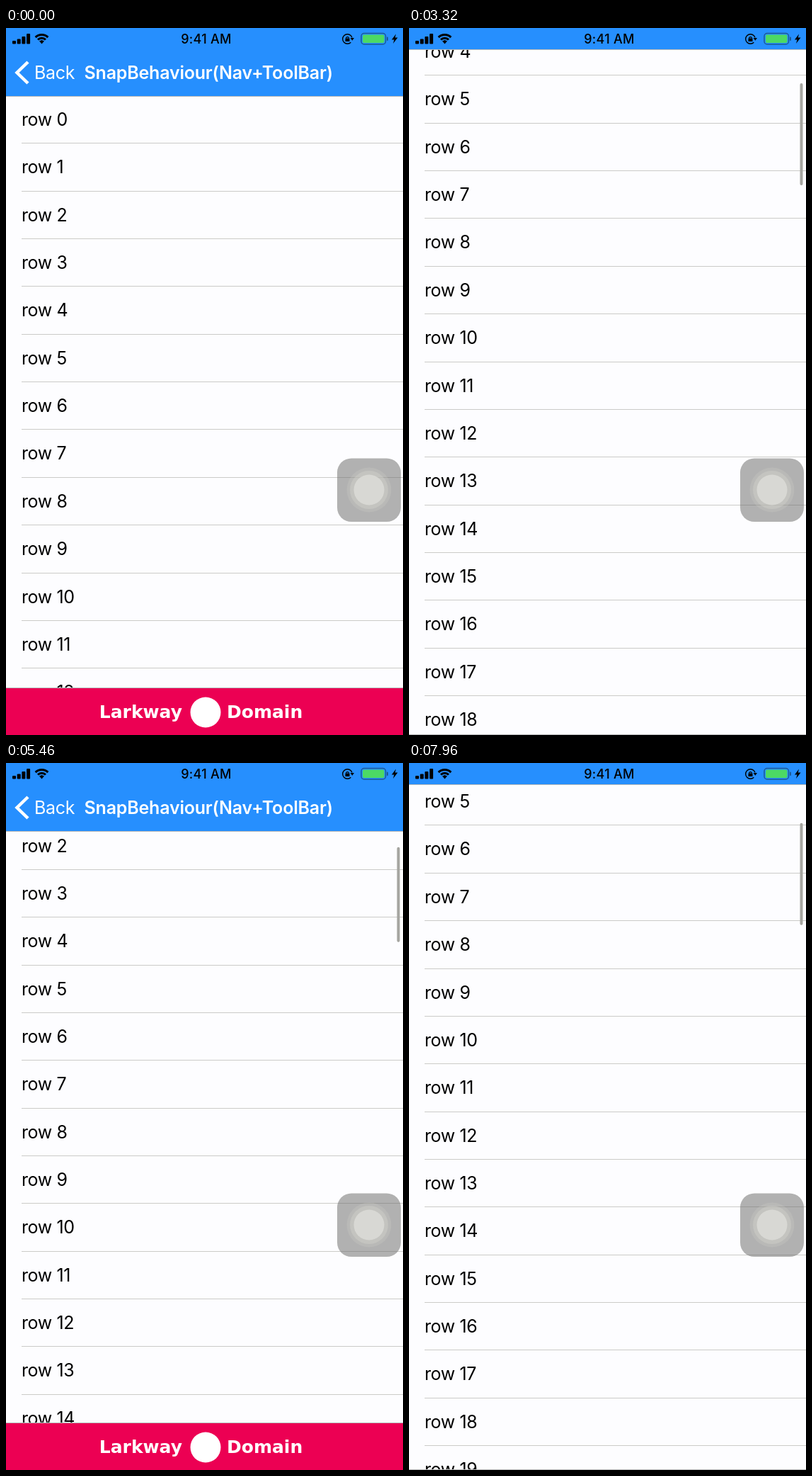
An HTML page with a canvas that plays this animation: 561 by 998 pixels, repeating every 8 s.

```html
<!DOCTYPE html>
<html lang="en">
<head>
<meta charset="utf-8">
<title>Snapping bars</title>
<style>
  html, body { margin: 0; width: 100%; height: 100%; overflow: hidden; }
  canvas { display: block; }
</style>
</head>
<body>
<canvas id="stage" width="561" height="998"></canvas>
<script>
const ctx = document.getElementById('stage').getContext('2d');
const W = 561, H = 998, LOOP = 8000;
const STATUS = 30, BAR = 66, ROW = 67.35;
const DECAY = 500, SNAP_DISTANCE = 52;
const BLUE = '#268ffe', PINK = '#ec0053', HAIRLINE = '#b8b8b8';

// Each flick glides exponentially towards its resting offset.
const flicks = [
  { start: 1726, to: 381, hide: true },
  { start: 3828, to: 138, hide: false },
  { start: 5956, to: 374, hide: true },
  { start: 7902, to: 750, hide: true }
];

const clamp = v => Math.max(0, Math.min(1, v));
const mix = (a, b, k) => a + (b - a) * k;

function stateAt(time) {
  let offset = 0, hidden = 0, thumb = 0;
  flicks.forEach((flick, i) => {
    if (time < flick.start) return;
    const end = i + 1 < flicks.length ? Math.min(time, flicks[i + 1].start) : time;
    const age = end - flick.start;
    const from = offset;
    offset = mix(flick.to, from, Math.exp(-age / DECAY));
    const progress = clamp(Math.abs(offset - from) / SNAP_DISTANCE);
    hidden = flick.hide ? Math.max(hidden, progress) : Math.min(hidden, 1 - progress);
    thumb = clamp(age / 40) * clamp((2000 - age) / 300);
  });
  return { offset, hidden, thumb };
}

function rect(x, y, w, h, color) {
  ctx.fillStyle = color;
  ctx.fillRect(x, y, w, h);
}

function rounded(x, y, w, h, r, color) {
  ctx.fillStyle = color;
  ctx.beginPath();
  ctx.roundRect(x, y, w, h, r);
  ctx.fill();
}

function disc(x, y, r, color) {
  ctx.fillStyle = color;
  ctx.beginPath();
  ctx.arc(x, y, r, 0, Math.PI * 2);
  ctx.fill();
}

function arc(x, y, r, from, to, width) {
  ctx.lineWidth = width;
  ctx.beginPath();
  ctx.arc(x, y, r, from * Math.PI, to * Math.PI);
  ctx.stroke();
}

function polygon(points, color) {
  ctx.fillStyle = color;
  ctx.beginPath();
  points.forEach(([x, y]) => ctx.lineTo(x, y));
  ctx.fill();
}

function label(text, x, y, font, color, spacing = 0, align = 'left') {
  ctx.font = font;
  ctx.letterSpacing = spacing + 'px';
  ctx.textAlign = align;
  ctx.fillStyle = color;
  ctx.fillText(text, x, y);
}

function drawRows(offset) {
  rect(0, 0, W, H, '#fdfdff');
  const first = Math.max(0, Math.floor((offset - BAR) / ROW));
  for (let i = first; i < first + 16; i++) {
    const top = 96 + i * ROW - offset;
    label('row ' + i, 22, Math.round(top + 42), '25px Inter, sans-serif', '#000', -0.4);
    rect(22, Math.round(top + ROW - 1), W - 22, 1, '#cbcbc8');
  }
}

function drawThumb({ offset, hidden, thumb }) {
  ctx.globalAlpha = thumb;
  const top = mix(97.3, 24.6, hidden) + offset * 0.146;
  rounded(552.5, top, 4, mix(134, 144, hidden), 2, '#a5a5a0');
  ctx.globalAlpha = 1;
}

function drawNavBar(hidden) {
  const shift = -BAR * hidden;
  const bottom = STATUS + BAR + shift;
  rect(0, 0, W, bottom, BLUE);
  rect(0, bottom, W, 1, HAIRLINE);
  ctx.save();
  ctx.translate(0, shift);
  ctx.globalAlpha = 1 - hidden;
  ctx.strokeStyle = '#fff';
  ctx.lineWidth = 4.5;
  ctx.beginPath();
  ctx.moveTo(31, 48);
  ctx.lineTo(15.5, 63);
  ctx.lineTo(31, 78);
  ctx.stroke();
  label('Back', 40, 72, '25px Inter, sans-serif', '#fff', -0.3);
  label('SnapBehaviour(Nav+ToolBar)', 110.5, 72, '600 25px Inter, sans-serif', '#fff', -0.2);
  ctx.restore();
}

function drawToolBar(hidden) {
  const top = H - BAR * (1 - hidden);
  const font = 'bold 25px "DejaVu Sans", sans-serif';
  rect(0, top, W, BAR, PINK);
  rect(0, top - 1, W, 1, HAIRLINE);
  label('Larkway', 249, top + 42, font, '#fff', 0, 'right');
  label('Domain', 312, top + 42, font, '#fff');
  disc(282, top + 34, 21.5, '#fff');
}

function drawStatus() {
  rect(0, 0, W, STATUS, BLUE);
  [4.5, 7, 10.5, 14.5].forEach((h, i) => rounded(9 + i * 6.7, 22.5 - h, 5, h, 1, '#000'));

  ctx.strokeStyle = '#000';
  arc(50.5, 22, 12.5, 1.25, 1.75, 3);
  arc(50.5, 22, 7.8, 1.25, 1.75, 3);
  polygon([[50.5, 22.5], [47, 18.5], [50.5, 17], [54, 18.5]], '#000');

  label('9:41 AM', 283, 22, '500 18px Inter, sans-serif', '#000', 0.3, 'center');

  arc(482.5, 15.5, 6.8, 0.25, 1.9, 1.4);
  polygon([[486.5, 14], [492, 14], [489.3, 17.8]], '#000');
  rect(479.5, 14.5, 6, 4.5, '#000');
  arc(482.5, 14.5, 1.9, 1, 2, 1.2);

  ctx.strokeStyle = '#1d5a94';
  ctx.lineWidth = 1.5;
  ctx.beginPath();
  ctx.roundRect(502, 7.5, 34.5, 15.5, 4);
  ctx.stroke();
  rounded(504, 9.5, 30.5, 11.5, 2, '#4cd964');
  rounded(538, 12.5, 2, 5.5, 1, '#1d5a94');
  polygon([[551, 8.5], [545, 16.5], [548.5, 16.5], [547, 22], [553.5, 13.5], [549.8, 13.5]], '#000');
}

function drawTouchButton() {
  rounded(468, 607.5, 90, 89.5, 20, 'rgba(110, 110, 108, .53)');
  disc(513, 652, 31.5, 'rgba(205, 205, 200, .25)');
  disc(513, 652, 27, 'rgba(208, 208, 203, .45)');
  disc(513, 652, 21.5, 'rgba(219, 219, 214, .92)');
}

function draw() {
  const state = stateAt(performance.now() % LOOP);
  drawRows(state.offset);
  drawThumb(state);
  drawToolBar(state.hidden);
  drawNavBar(state.hidden);
  drawStatus();
  drawTouchButton();
  requestAnimationFrame(draw);
}

draw();
</script>
</body>
</html>
```
